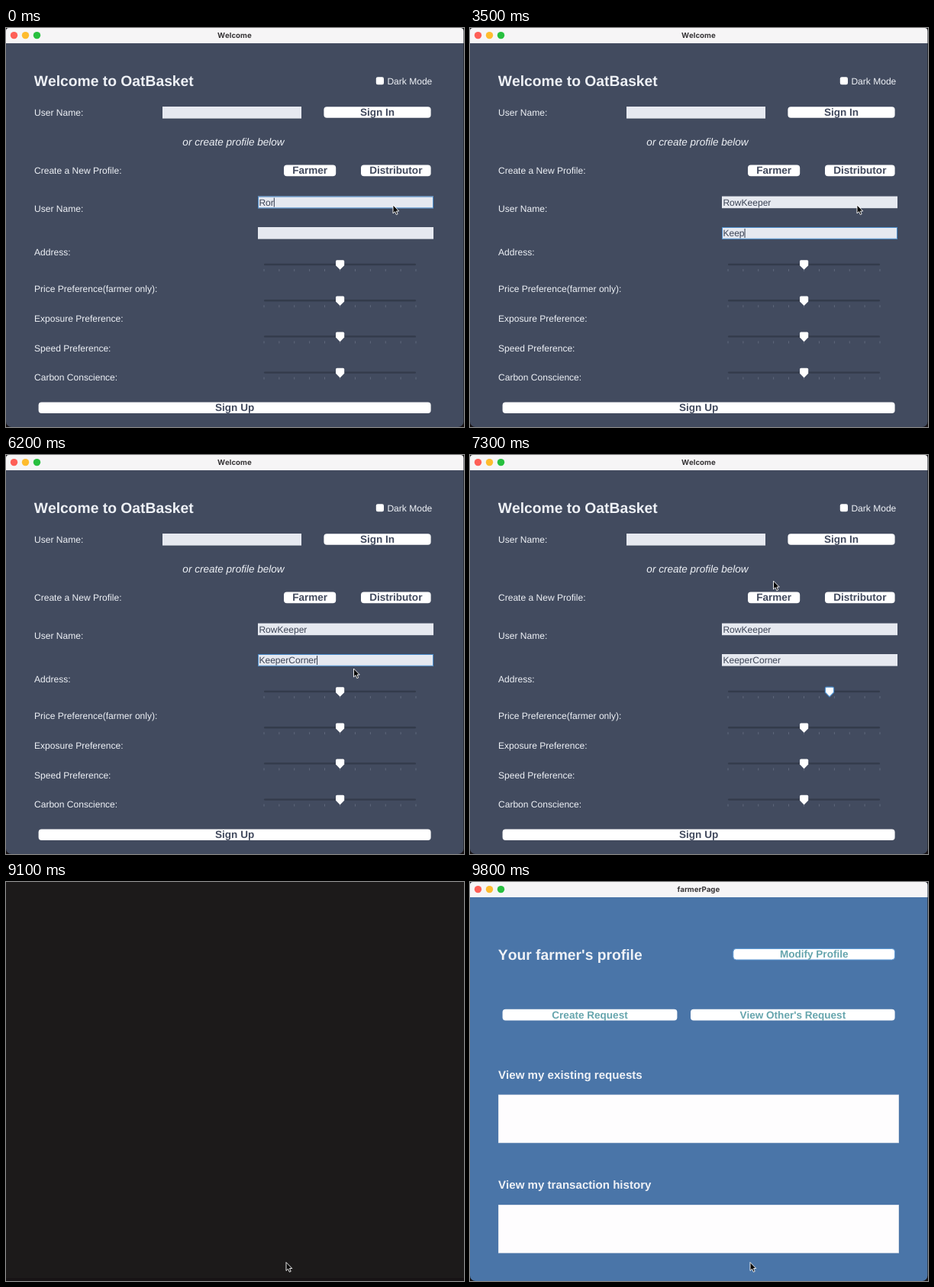
Write an HTML page with a canvas that moves like this. It is 600 px wide and 523 px high and loops after 9.9 s.

```html
<!DOCTYPE html>
<html lang="en">
<head>
<meta charset="utf-8">
<title>Welcome</title>
<style>
  html, body { margin: 0; width: 100%; height: 100%; overflow: hidden; background: #1c1a1a; }
  canvas { display: block; }
</style>
</head>
<body>
<canvas id="stage" width="600" height="523"></canvas>
<script>
const ctx = document.getElementById('stage').getContext('2d');
const LOOP = 9900, STEP = 100;
const SANS = '"Liberation Sans", Arial, sans-serif';
const BLUE = '#4a8ccb', INK = '#424a5e', PALE = '#eef1f6';

// Typed text: [time, content]
const NAME = [
  [0, 'Ror'], [300, 'RorK'], [500, 'RorKe'], [800, 'RorK'], [900, 'Ror'], [1000, 'Ro'],
  [1300, 'Row'], [1600, 'RowK'], [1800, 'RowKe'], [1900, 'RowKee'], [2000, 'RowKeep'],
  [2100, 'RowKeepe'], [2200, 'RowKeeper']
];
const PLACE = [
  [0, ''], [3000, 'K'], [3200, 'Ke'], [3300, 'Kee'], [3500, 'Keep'], [4000, 'Kee'],
  [4500, 'Keep'], [4600, 'Keepe'], [4700, 'Keeper'], [5000, 'KeeperC'], [5200, 'KeeperCo'],
  [5400, 'KeeperCor'], [5500, 'KeeperCorn'], [5700, 'KeeperCorne'], [5800, 'KeeperCorner']
];
const FOCUS = [[0, 'name'], [2500, 'place'], [6500, 'slider'], [8000, 'farmer'], [9000, 'signup']];

// Pointer stops: [time, x, y]
const POINTER = [
  [5900, 507, 232], [6200, 455.5, 280], [6400, 438, 307], [6600, 438, 311], [6900, 471, 311],
  [7000, 471, 309], [7300, 397.5, 165], [7500, 397, 182], [8200, 397, 183],
  [8700, 370, 492], [8900, 367, 498.5]
];

const at = (list, t) => list.reduce((v, [start, value]) => t >= start ? value : v, list[0][1]);

function pointerAt(t) {
  let a = POINTER[0];
  for (const b of POINTER) {
    if (t < b[0]) {
      if (a === b) break;
      const k = (t - a[0]) / (b[0] - a[0]), e = k * k * (3 - 2 * k);
      return [a[1] + (b[1] - a[1]) * e, a[2] + (b[2] - a[2]) * e];
    }
    a = b;
  }
  return [a[1], a[2]];
}

function text(str, x, y, size, color, style = '', align = 'left') {
  ctx.font = `${style} ${size}px ${SANS}`;
  ctx.textAlign = align;
  ctx.fillStyle = color;
  ctx.fillText(str, x, y);
}

function rect(x, y, w, h, color) {
  ctx.fillStyle = color;
  ctx.fillRect(x, y, w, h);
}

function box(x, y, w, h, r, fill, stroke) {
  ctx.beginPath();
  ctx.roundRect(x, y, w, h, r);
  ctx.fillStyle = fill;
  ctx.fill();
  if (stroke) {
    ctx.strokeStyle = stroke;
    ctx.lineWidth = 1;
    ctx.stroke();
  }
}

function button(label, x, y, w, color, fill = '#fff', stroke) {
  box(x, y, w, 14.6, 4, fill, stroke);
  text(label, x + w / 2, y + 11.8, 13.55, color, 'bold', 'center');
}

function field(x, y, w, str = '', focused = false) {
  rect(x, y, w, 15.6, '#e6e9f0');
  if (focused) {
    ctx.strokeStyle = BLUE;
    ctx.lineWidth = 1;
    ctx.strokeRect(x + .5, y + .5, w - 1, 14.8);
  }
  text(str, x + 1.4, y + 12, 12.06, '#3c4456');
  if (focused) rect(x + 1.4 + ctx.measureText(str).width, y + 2, 1, 12, '#30384a');
}

function slider(y, x, focused) {
  box(338, y - 1.2, 199, 2.4, 1.2, '#333b4b');
  for (let i = 0; i <= 10; i++) rect(337.6 + i * 19.9, y + 6, .8, 3, '#687084');
  ctx.beginPath();
  ctx.moveTo(x - 4, y - 5.8);
  ctx.lineTo(x + 4, y - 5.8);
  ctx.quadraticCurveTo(x + 5.6, y - 5.8, x + 5.6, y - 4.2);
  ctx.lineTo(x + 5.6, y + 1.2);
  ctx.lineTo(x, y + 6.8);
  ctx.lineTo(x - 5.6, y + 1.2);
  ctx.lineTo(x - 5.6, y - 4.2);
  ctx.quadraticCurveTo(x - 5.6, y - 5.8, x - 4, y - 5.8);
  ctx.fillStyle = '#fff';
  ctx.fill();
  if (focused) {
    ctx.strokeStyle = BLUE;
    ctx.lineWidth = 1.2;
    ctx.stroke();
  }
}

function frame(title, color) {
  box(0, 0, 599.4, 523, [4, 4, 7, 7], color);
  box(0, 0, 599.4, 20, [4, 4, 0, 0], '#f6f5f6');
  ['#fe5f57', '#febc2e', '#28c03f'].forEach((dot, i) => {
    ctx.beginPath();
    ctx.arc(10.5 + i * 15, 9.6, 4.7, 0, Math.PI * 2);
    ctx.fillStyle = dot;
    ctx.fill();
  });
  ctx.font = '700 9.7px Inter, sans-serif';
  ctx.textAlign = 'center';
  ctx.fillStyle = '#373537';
  ctx.fillText(title, 299.3, 13);
}

function welcome(t, px) {
  const focus = at(FOCUS, t);
  frame('Welcome', '#424b5f');
  text('Welcome to OatBasket', 36.8, 75.6, 19.3, PALE, 'bold');
  box(484.8, 64.2, 10.2, 10, 2.2, '#fff');
  text('Dark Mode', 499.4, 73.6, 12.06, PALE);
  [['User Name:', 115], ['Create a New Profile:', 191.3], ['User Name:', 241], ['Address:', 297.6],
   ['Price Preference(farmer only):', 345.6], ['Exposure Preference:', 384.5],
   ['Speed Preference:', 423.5], ['Carbon Conscience:', 462.4]]
    .forEach(([label, y]) => text(label, 37, y, 12.06, PALE));
  text('or create profile below', 298, 153.8, 13.55, PALE, 'italic', 'center');

  field(205, 103, 182);
  field(330, 220.6, 230, at(NAME, t), focus === 'name');
  field(330, 261, 230, at(PLACE, t), focus === 'place');

  button('Sign In', 416.4, 103.2, 140.2, INK);
  const hover = t >= 7500 && t <= 8200;
  button('Farmer', 364, 179.6, 68.2, INK, t === 8000 ? '#ececec' : hover ? '#f6f6f6' : '#fff',
    focus === 'farmer' && BLUE);
  button('Distributor', 465, 179.6, 91.6, INK);
  const down = focus === 'signup';
  button('Sign Up', 42.6, 490.4, 514, INK, down ? '#eee' : '#fff', down && BLUE);

  const drag = t < 6600 ? 437.6 : Math.min(471, Math.max(437.6, px));
  slider(310, t < 6900 ? drag : 471, focus === 'slider');
  [357.2, 404.4, 451.6].forEach(y => slider(y, 437.6));
}

function profile() {
  const teal = '#66a5ad';
  frame('farmerPage', '#4a75a8');
  text("Your farmer's profile", 36.8, 101.8, 19.3, PALE, 'bold');
  button('Modify Profile', 344.8, 87.4, 211.8, teal, '#fff', '#5a97d4');
  button('Create Request', 42.6, 166.8, 228.8, teal);
  button("View Other's Request", 289, 166.8, 267.6, teal);
  text('View my existing requests', 37, 258, 15.1, PALE, 'bold');
  text('View my transaction history', 37, 402.4, 15.1, PALE, 'bold');
  for (const y of [278.6, 423]) {
    rect(37, y, 525, 63.6, '#c9d3e2');
    rect(37.6, y + .6, 523.8, 62.4, '#fefdfe');
  }
}

function pointer(x, y) {
  ctx.beginPath();
  [[0, 0], [0, 11], [2.5, 8.7], [4.3, 12.7], [6.2, 11.9], [4.5, 8], [7.8, 8]]
    .forEach(([dx, dy]) => ctx.lineTo(x + dx, y + dy));
  ctx.closePath();
  ctx.fillStyle = '#080808';
  ctx.fill();
  ctx.strokeStyle = '#fff';
  ctx.lineWidth = .9;
  ctx.stroke();
}

function draw(t) {
  ctx.fontKerning = 'none';
  ctx.textRendering = 'geometricPrecision';
  rect(0, 0, 600, 523, '#1c1a1a');
  rect(0, 519, 600, 4, '#171315');
  const [x, y] = pointerAt(t);
  if (t < 9100) welcome(t, x);
  else if (t >= 9200) profile();
  pointer(x, y);
}

const start = performance.now();
function tick() {
  const t = (performance.now() - start) % LOOP;
  draw(Math.floor(t / STEP) * STEP);
  requestAnimationFrame(tick);
}
tick();
</script>
</body>
</html>
```
